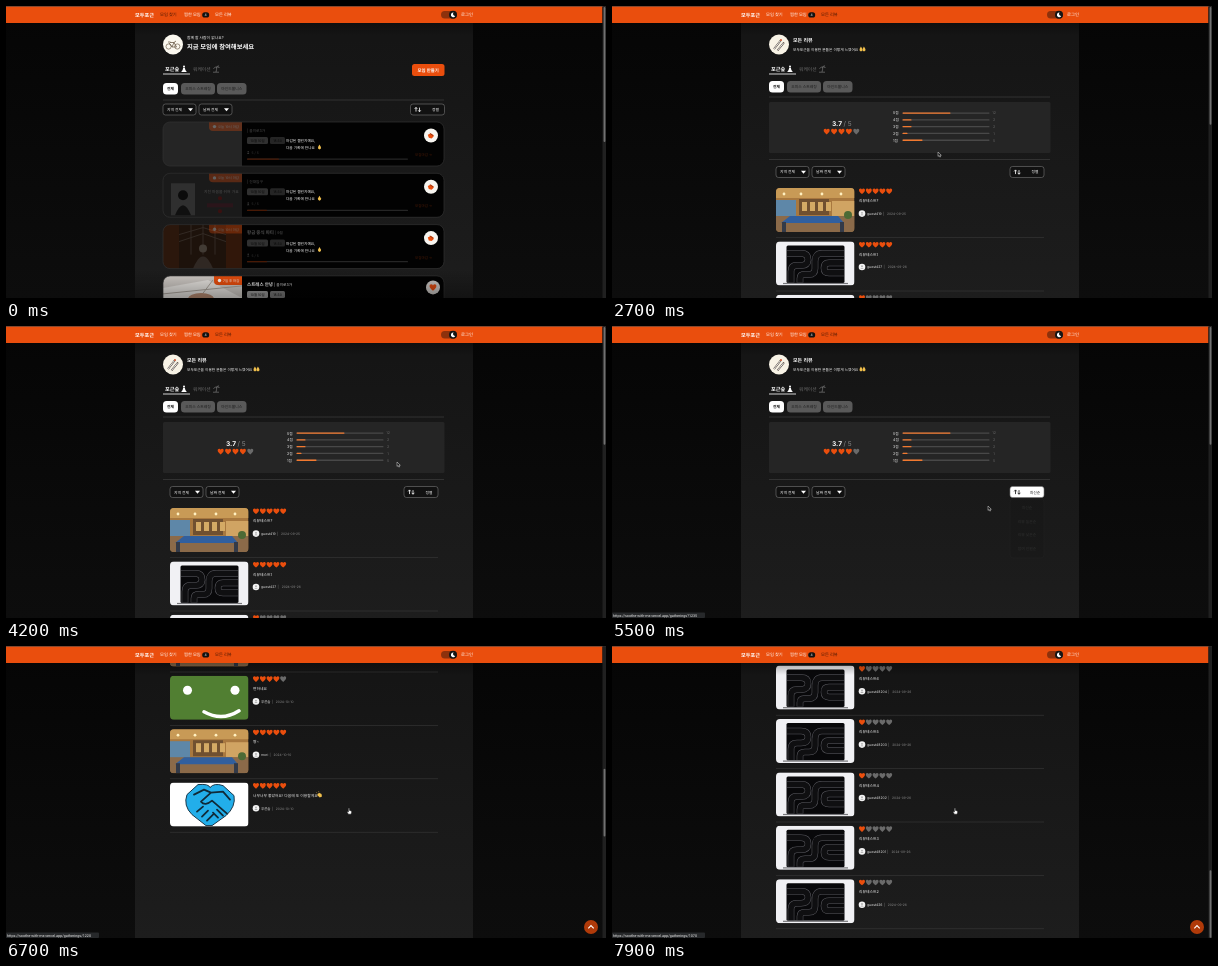
An HTML page that plays this animation: 600x292 px, repeating every 8 s.

```html
<!DOCTYPE html>
<html lang="ko">
<head>
<meta charset="utf-8">
<style>
html, body { margin: 0; width: 100%; height: 100%; overflow: hidden; background: #080808; }
svg { display: block; width: 100vw; height: 100vh; font-family: Inter, "Noto Sans CJK KR", "Noto Sans CJK", sans-serif; text-rendering: geometricPrecision; }
</style>
</head>
<body>
<svg id="stage" viewBox="0 0 600 292"></svg>
<script>
const LOOP = 8000;
const ORANGE = '#ea4e0d';
const PITCH = 53.4;
const HEART = 'M0 2.9C-4 .2-3.4-2.7-1.5-2.7Q-.4-2.7 0-1.7Q.4-2.7 1.5-2.7C3.4-2.7 4 .2 0 2.9Z';

const text = (x, y, size, fill, s, extra = '') =>
  `<text x="${x}" y="${y}" font-size="${size}" fill="${fill}" ${extra}>${s}</text>`;
const rect = (x, y, w, h, fill, r = 0, extra = '') =>
  `<rect x="${x}" y="${y}" width="${w}" height="${h}" rx="${r}" fill="${fill}" ${extra}/>`;
const circle = (x, y, r, fill, extra = '') =>
  `<circle cx="${x}" cy="${y}" r="${r}" fill="${fill}" ${extra}/>`;
const path = (d, fill, extra = '') => `<path d="${d}" fill="${fill}" ${extra}/>`;
const line = (x1, x2, y, color = '#444') => rect(x1, y, x2 - x1, .6, color);
const group = (id, body, extra = '') => `<g id="${id}" ${extra}>${body}</g>`;
const at = (x, y, body) => `<g transform="translate(${x} ${y})">${body}</g>`;
const BOLD = 'font-weight="700"';
const MID = 'text-anchor="middle"';

const hearts = (score, step) => [0, 1, 2, 3, 4]
  .map(i => at(i * step, 0, path(HEART, i < score ? ORANGE : '#6a6a6a'))).join('');

// Short strands scattered over the noodle bowl
const strands = Array.from({ length: 26 }, (_, i) => {
  const angle = i * 2.4, r = 2.6 * Math.sqrt(i);
  const color = ['#d8b078', '#5f7a3a', '#3b2a1e', '#b5402c'][i % 4];
  return path(`M${(39 + r * Math.cos(angle)).toFixed(1)} ${(24 + r * .65 * Math.sin(angle)).toFixed(1)}q2-2.5 4-.5`,
    'none', `stroke="${color}" stroke-width="1.3"`);
}).join('');

// Thumbnails, 78.5 x 44
const pictures = {
  laptop: rect(0, 0, 78.5, 44, '#f1f1f4') + rect(10.5, 4, 58, 37.5, '#08080a', 1.5) +
    [['#5a5a60', 6.6], ['#0f0f11', 5.6]].map(([color, width]) => path(
      'M11 12H25Q32 12 32 18T25 24H21Q15 24 15 30V41M24 41V37Q24 33 29 33H33Q39 33 39 27V20Q39 12 46 12H68' +
      'M68 21.5H53Q48 21.5 48 26.5T53 31.5H68', 'none', `stroke="${color}" stroke-width="${width}"`)).join('') +
    rect(7, 41.5, 65, 1.2, '#77777b'),
  office: rect(0, 0, 78.5, 44, '#a8783f') + rect(0, 0, 78.5, 10, '#c89a56') +
    rect(0, 12, 20, 17, '#5e87a8') + rect(23, 11, 30, 16, '#705030') + rect(56, 13, 22.5, 15, '#d0a463') +
    [26, 34, 42, 50].map(x => rect(x, 14, 5, 9, '#d4aa65')).join('') +
    rect(0, 28, 78.5, 16, '#8b6a49') + path('M14 28H62L68 35H5Z', '#315f9e') +
    rect(6, 34, 4, 10, '#333a48') + rect(64, 34, 4, 10, '#333a48') +
    [8, 25, 46, 65].map(x => circle(x, 6, 1.4, '#fff0c0')).join('') + circle(72, 27, 4, '#4c6a35'),
  noodles: rect(0, 0, 78.5, 44, '#aaa8a4') + '<ellipse cx="39" cy="24" rx="33" ry="19.5" fill="#ececea"/>' +
    '<ellipse cx="39" cy="25" rx="20" ry="13" fill="#d3cec6"/><ellipse cx="40" cy="24.5" rx="15" ry="9.5" fill="#86603b"/>' +
    strands + path('M35 17L45 8L43 18Z', '#d9a070'),
  smile: rect(0, 0, 78.5, 44, '#517f32') + circle(17.5, 14.5, 4.5, '#fff') + circle(65, 14.5, 4.5, '#fff') +
    path('M34 36Q52 46 69 35', 'none', 'stroke="#fff" stroke-width="3.4" stroke-linecap="round"'),
  hands: rect(0, 0, 78.5, 44, '#fff') +
    path('M17 12L28 2Q39 1 40 5Q44 0 53 3L64 13Q66 24 56 33L42 43H36L22 32Q13 23 17 12Z', '#22aeea', 'stroke="#17374a" stroke-width="1"') +
    path('M24 12L34 7L41 10L53 9L60 17M41 10L31 19Q35 24 42 18L57 31M27 29L33 24M32 34L38 28M37 38L43 32M48 35L43 30M53 33L47 27',
      'none', 'stroke="#102a38" stroke-width="1.8" stroke-linecap="round" stroke-linejoin="round"'),
};

const trial = (n, score, user) => ({ pic: 'laptop', score, title: '리뷰테스트' + n, user, date: '2024-09-26' });
const oldest = [
  { pic: 'office', score: 5, title: '리뷰테스트?', user: 'guest419', date: '2024-09-25' },
  trial(1, 5, 'guest427'), trial(2, 1, 'guest426'), trial(3, 1, 'guest48201'), trial(4, 1, 'guest48202'),
  trial(5, 1, 'guest48203'), trial(6, 1, 'guest48204'), trial(7, 2, 'guest48205'), trial(8, 3, 'guest48206'),
  { pic: 'noodles', score: 5, title: 'ddasdsa', user: '푸른솔', date: '2024-10-04' },
];
const recent = (pic, score, title, user = '푸른솔') => ({ pic, score, title, user, date: '2024-10-10' });
const newest = [
  recent('office', 5, '좋아요'), recent('smile', 5, '편안했어요'), recent('office', 4, '추천합니다', 'mori'),
  recent('noodles', 5, '맛있어요'), recent('office', 5, '또 올게요'), recent('smile', 5, '최고예요'),
  recent('office', 5, '재밌어요', 'mori'), recent('smile', 4, '편하네요'), recent('office', 5, '짱~', 'mori'),
  { ...recent('hands', 5, '너무너무 좋았어요! 다음에 또 이용할게요'), clap: true },
  recent('office', 5, '좋았어요'), recent('smile', 3, '괜찮아요'), ...oldest.slice().reverse(),
];

const clap = path('M147 12.5L149 10.2L151.5 11.5L152 13.8L149.8 15Z', '#f0bf4c') +
  path('M147.3 10.6L146.3 9.8M148.8 9.6L148.6 8.6', 'none', 'stroke="#f0bf4c" stroke-width=".5"');

const review = (r, i) => at(164, 182 + i * PITCH,
  `<g clip-path="url(#thumb)"><use href="#${r.pic}"/></g>` + at(86, 3.2, hearts(r.score, 6.8)) +
  text(83, 14.2, 3.8, '#f2f2f2', r.title) + (r.clap ? clap : '') +
  circle(86, 25.6, 3.3, '#f2f2f2') + circle(86, 24.8, .9, '#aaa') + path('M84.4 27.3Q86 25.2 87.6 27.3Z', '#aaa') +
  text(91, 27, 3.45, '#e0e0e0', `${r.user}<tspan dx="1.2" fill="#888">|</tspan><tspan dx="3" font-size="3.25" fill="#8b8b8b">${r.date}</tspan>`) +
  line(0, 268, 49.3, '#383838'));
const reviews = (list, from = 0) => list.map((r, i) => review(r, i + from)).join('');

const select = (x, y, label) =>
  rect(x, y, 33, 11, '#111', 2.5, 'stroke="#777" stroke-width=".6"') + text(x + 4, y + 7, 3.8, '#fff', label) +
  path(`M${x + 25} ${y + 4.3}h5l-2.5 3z`, '#fff');
const sortArrows = (x, y, c) =>
  path(`M${x} ${y + 2}v-4m-1.3 1.3l1.3-1.5l1.3 1.5M${x + 3.5} ${y - 2}v4m-1.3-1.3l1.3 1.5l1.3-1.5`, 'none', `stroke="${c}" stroke-width=".8"`);
const sortButton = (x, y, label, on) =>
  rect(x, y, 34, 11, on ? '#fff' : '#111', 2.5, 'stroke="#777" stroke-width=".6"') +
  sortArrows(x + 5.5, y + 5.6, on ? '#111' : '#fff') + text(x + 25, y + 7, 3.8, on ? '#111' : '#fff', label, MID);

const chip = (x, y, w, label, on) => rect(x, y, w, 11.5, on ? '#fff' : '#595959', 3.5) +
  text(x + w / 2, y + 7.2, 3.8, on ? '#111' : '#1b1b1b', label, `${MID} ${on ? BOLD : ''}`);

const tabs = chipY =>
  text(159, 64.8, 5.2, '#fff', '포근숲', BOLD) +
  circle(178, 60.6, 1, '#fff') + path('M177.2 61.8H178.8L179.4 64L180.8 66H175.2L176.6 64Z', '#fff') +
  rect(157, 67.6, 27, .8, '#fff') + text(187, 64.8, 4.8, '#6c6c6c', '워케이션') +
  path('M207 66.2H213M210 66Q211 63 210.5 60.8M207.5 62.8Q209 60 213.5 61.5M211 60.5L213 59.8', 'none', 'stroke="#777" stroke-width=".7"') +
  chip(157, chipY, 15, '전체', true) + chip(175, chipY, 34, '오피스 스트레칭') + chip(211, chipY, 29.5, '마인드풀니스');

const pray = (x, y) => path(`M${x} ${y}q-2.2-1-1.4-2.6L${x - .1} ${y - 5}L${x + 1.4} ${y - 2.6}q.8 1.6-1.4 2.6`, '#f0bf4c');

function card(i, title, place, picture, open) {
  const dim = open ? 1 : .3;
  const tagX = open ? 51 : 46;
  const body = rect(0, 0, 281, 44, '#020202', 7) +
    `<g clip-path="url(#card)"><g opacity="${open ? 1 : .3}">${picture}</g>` +
    `<g opacity="${dim}">${path(`M${tagX} 0H79V9H${tagX + 4}Q${tagX} 9 ${tagX} 5Z`, ORANGE)}${circle(tagX + 5.5, 4.6, 1.7, '#fff')}` +
    `${text(tagX + 9, 6.1, 3.4, '#fff', open ? '7일 후 마감' : '오늘 19시 마감')}</g></g>` +
    `<g opacity="${dim}">` + text(84, 9.8, 4.5, '#fff', `${title} <tspan font-weight="400" font-size="3.7">| ${place}</tspan>`, BOLD) +
    rect(84, 15, 21, 7, '#999', 1.5) + text(94.5, 20, 3.4, '#111', '10월 10일', MID) +
    rect(107, 15, 15, 7, '#777', 1.5) + text(114.5, 20, 3.4, '#111', '18:30', MID) +
    circle(85.2, 29.7, .8, '#aaa') + path('M84 32Q85.2 29.6 86.4 32Z', '#aaa') + text(88.5, 32, 3.4, '#aaa', '5 / 5') +
    rect(84, 36.5, 161, 1.2, '#777', .6) +
    rect(84, 36.5, i ? 20 : 32, 1.2, ORANGE, .6) + text(252, 34, 3.5, ORANGE, '모집마감 →') + '</g>' +
    (open ? '' : text(123, 20.2, 3.7, '#fff', '마감된 챌린지예요,') + text(123, 27.2, 3.65, '#fff', '다음 기회에 만나요') + pray(156.5, 27.5)) +
    circle(open ? 270 : 268, open ? 11.5 : 13.5, 7, open ? '#c9c5c2' : '#f7f5f0') +
    (open ? at(270, 11.5, path(HEART, '#d9480f', 'transform="scale(1.15)"'))
          : at(267.8, 13.8, path('M-3-1L0-2.6L3-.6L2.6 1L.8 2.6L-2 2Z', ORANGE) + path('M-1-2.6L2.4 0', 'none', 'stroke="#743018" stroke-width=".7"'))) +
    rect(0, 0, 281, 44, 'none', 7, 'stroke="#333" stroke-width=".7"');
  return at(157, 116 + i * 51.3, body);
}

const cardPictures = [
  rect(0, 0, 79, 44, '#777'),
  rect(0, 0, 79, 44, '#555') + rect(8, 10, 24, 32, '#999') + circle(20, 22, 5, '#222') + path('M12 42Q20 22 28 42Z', '#333') +
    text(41, 20, 3.8, '#fff', '지친 마음을 쉬어 가요') + circle(57, 25, 2, '#b33') + rect(44, 30, 26, 4, '#845') + circle(57, 38, 2, '#b33'),
  rect(0, 0, 79, 44, '#5d3823') + rect(0, 0, 16, 44, '#8d4a26') + rect(63, 0, 16, 44, '#a04a20') +
    path('M16 10L40 3L63 10M16 17L40 9L63 17M28 0V30M40 0V30M52 0V30', 'none', 'stroke="#a28672" stroke-width="1"') +
    circle(40, 24, 4, '#d8c0aa') + path('M30 44Q40 20 50 44Z', '#9b8272'),
  rect(0, 0, 79, 44, '#cfcac5') + path('M0 12L45 4L79 22V44H0Z', '#e8e5e1') + path('M0 18L79 10M20 44L50 4', 'none', 'stroke="#aaa39b"') +
    '<ellipse cx="38" cy="23" rx="13" ry="6" fill="#b98c72"/>',
];

const gatherings =
  circle(167, 38.5, 10, '#fbf8ef') +
  path('M163.2 37L166 41H170.5L168 36.5H164M166 41L168 36.5M162 36H164.5M168 36.5L170 35', 'none', 'stroke="#5b4a35" stroke-width=".7"') +
  circle(162.6, 40.5, 2.6, 'none', 'stroke="#5b4a35" stroke-width=".6"') + circle(171.3, 40.5, 2.6, 'none', 'stroke="#5b4a35" stroke-width=".6"') +
  text(181, 32.5, 3.8, '#fff', '함께 할 사람이 없나요?') + text(181, 43.3, 6.35, '#fff', '지금 모임에 참여해보세요', BOLD) +
  tabs(77) + rect(406, 58, 32.5, 12, ORANGE, 2.5) + text(422.2, 65.8, 4.4, '#fff', '모임 만들기', `${MID} ${BOLD}`) +
  line(157, 438, 93.7) + select(157, 98, '지역 전체') + select(193, 98, '날짜 전체') + sortButton(404.5, 98, '정렬') +
  card(0, '', '을지로3가', cardPictures[0]) + card(1, '', '건대입구', cardPictures[1]) +
  card(2, '황금 중식 파티', '9월', cardPictures[2]) + card(3, '스트레스 안녕', '을지로3가', cardPictures[3], true) +
  rect(129, 264, 338, 28, 'url(#bottomFade)');

const histogram = [[12, 48], [2, 9], [2, 9], [1, 5], [5, 20]].map(([n, w], i) => {
  const y = 107 + i * 6.8;
  return text(281, y + 1.5, 3.7, '#eee', `${5 - i}점`) + rect(290.5, y - .6, 87, 1.3, '#484848', .6) +
    rect(290.5, y - .6, w, 1.3, '#f2792f', .6) + text(382, y + 1.4, 3.6, '#666', n, MID);
}).join('');

const reviewTop =
  circle(167, 38.5, 10, '#f8f3e6') +
  path('M162 43L169 34M165.5 44.5L172 36.5', 'none', 'stroke="#4b4038" stroke-width="1.8"') +
  path('M162 43L168.5 34.5M165.5 44.5L171.5 37', 'none', 'stroke="#fff" stroke-width=".9"') + circle(169, 34, 1, '#d85b39') +
  text(181, 36, 5, '#fff', '모든 리뷰', BOLD) + text(181, 45, 3.7, '#fff', '모두포근을 이용한 분들은 이렇게 느꼈어요') +
  pray(249, 45.5) + pray(252, 45.5) + tabs(75) + line(157, 438, 90.7) +
  rect(157, 96, 281.5, 51, '#252525', 1.5) +
  text(220, 120, 6.6, '#fff', '3.7 <tspan font-weight="400" fill="#888">/ 5</tspan>', BOLD) +
  at(214.7, 125.5, group('score', '')) + histogram + line(157, 438, 153.2) +
  select(164, 160.5, '지역 전체') + select(200, 160.5, '날짜 전체') + group('sort', '');

const options = ['최신순', '리뷰 높은순', '리뷰 낮은순', '참여 인원순'];
const dropdown = rect(398, 173, 34, 59, '#0a0d0b', 3, 'stroke="#555" stroke-width=".6"') +
  options.map((s, i) => text(415, 183 + i * 13.7, 3.8, '#fff', s, MID)).join('');

const header = rect(129, 17, 338, 12, 'url(#shade)') + rect(0, 0, 596.5, 17, ORANGE) + rect(0, 0, 600, .6, '#4b4542') +
  text(129, 10.7, 5.2, '#fff', '모두포근', BOLD) +
  text(154, 10.4, 4.25, '#fff', '모임 찾기', 'id="navFind" font-weight="500"') +
  text(178, 10.4, 4.25, '#fff', '찜한 모임', 'font-weight="500"') +
  rect(196.2, 6.3, 7, 5.2, '#111', 2.6) + text(199.7, 10.2, 3.4, '#fff', '4', MID) +
  text(209, 10.4, 4.25, '#fff', '모든 리뷰', 'id="navReviews" font-weight="500"') +
  rect(435, 5, 16, 7.5, '#8d310c', 3.7) + circle(447, 8.8, 4, '#151515') +
  path('M447.6 6.6A2.3 2.3 0 1 0 449.2 10A2 2 0 0 1 447.6 6.6', '#fff') + text(455, 10.4, 4.3, '#fff', '로그인', 'font-weight="500"');

const arrow = path('M0 0V5.2L1.3 4.1L2.2 6L3.1 5.6L2.3 3.8H3.9Z', '#111', 'stroke="#ddd" stroke-width=".6" transform="scale(.85)"');
const hand = path('M-.6-2.6Q0-3.2 .5-2.6V-.6L2.6 0V2L1.8 3.2H-.6L-2 1L-1.4 .4L-.6 1Z', '#fff', 'stroke="#111" stroke-width=".5"');

const fade = (id, stops) => `<linearGradient id="${id}" x2="0" y2="1">` +
  stops.map(([c, o], i) => `<stop offset="${i}" stop-color="${c}" stop-opacity="${o}"/>`).join('') + '</linearGradient>';
const stage = document.getElementById('stage');
stage.innerHTML = '<defs>' +
  fade('side', [['#050505', 1], ['#0d0d0d', 1]]) + fade('column', [['#141414', 1], ['#1d1d1d', 1]]) +
  fade('shade', [['#000', .3], ['#000', 0]]) + fade('bottomFade', [['#000', 0], ['#000', .35]]) +
  '<clipPath id="thumb"><rect width="78.5" height="44" rx="4"/></clipPath>' +
  '<clipPath id="card"><rect width="281" height="44" rx="7"/></clipPath>' +
  Object.entries(pictures).map(([id, body]) => group(id, body)).join('') + '</defs>' +
  rect(0, 0, 600, 292, 'url(#side)') + rect(129, 0, 338, 292, 'url(#column)') +
  group('gatherings', gatherings) +
  group('reviewPage', reviewTop + group('oldest', reviews(oldest)) +
    group('newest', reviews(newest.slice(0, 10))) + group('more', reviews(newest.slice(10, 20), 10)) + group('menu', dropdown)) +
  header + rect(596.5, .6, 3.5, 291.4, '#202020') + rect(597.6, 1, 1.8, 118, '#707070', .9, 'id="thumbBar"') +
  group('toTop', circle(585, 281, 7, '#b03a09') + path('M582.3 282.3L585 279.6L587.7 282.3', 'none', 'stroke="#fff" stroke-width="1.1"')) +
  group('status', rect(0, 286.5, 74, 5.5, '#27292b', 1, 'id="statusBox"') + text(1, 290.7, 3.7, '#f0f0f0', '', 'id="url" style="font-family:Roboto,sans-serif"')) +
  group('cursor', group('arrow', arrow) + group('hand', hand));

const el = {};
stage.querySelectorAll('[id]').forEach(n => el[n.id] = n);

const ease = p => p * p * (3 - 2 * p);
const ramp = (t, a, b) => Math.min(1, Math.max(0, (t - a) / (b - a)));
const show = (node, on) => node.setAttribute('display', on ? 'inline' : 'none');
const move = (node, x, y) => node.setAttribute('transform', `translate(${x} ${y})`);

// Keys are [time, ...values], eased between neighbours
function track(keys, t) {
  const i = keys.findIndex(k => k[0] > t);
  if (i === 0) return keys[0].slice(1);
  if (i < 0) return keys[keys.length - 1].slice(1);
  const [a, b] = [keys[i - 1], keys[i]];
  const p = ease(ramp(t, a[0], b[0]));
  return a.slice(1).map((v, j) => v + (b[j + 1] - v) * p);
}

const pointer = [[300, 330, 150], [1050, 217, 9], [1500, 217, 9], [2000, 286, 80], [2600, 326, 146], [3600, 326, 146],
  [4100, 391, 136], [4300, 391, 136], [4700, 416, 166], [4900, 416, 166], [5200, 415, 182], [5350, 415, 182],
  [5490, 376, 180], [5600, 376, 180], [6000, 343, 165]];
const scrolling = [[2700, 0], [3150, 429.4], [3600, 429.4], [4050, 0], [6050, 0], [6550, 429.4], [6700, 526], [6900, 526], [7500, 963.4]];
const links = [[0, ''], [1050, 'reviews'], [2300, ''], [5450, 'gatherings?1235'], [5900, ''], [6450, 'gatherings/1220'],
  [7300, 'gatherings/1132'], [7500, 'gatherings/1070']];

function appear(node, t, start, length) {
  const p = ramp(t, start, start + length);
  node.setAttribute('opacity', p);
  move(node, 0, 8 * (1 - p));
}

function setOnce(node, key, html) {
  if (node.dataset.n === key) return;
  node.dataset.n = key;
  node.innerHTML = html;
}

function update(t) {
  const onReviews = t >= 1500;
  const sorted = t >= 5400;
  const [scroll] = track(scrolling, t);
  show(el.gatherings, !onReviews);
  show(el.reviewPage, onReviews);
  move(el.reviewPage, 0, -scroll);
  el.navFind.setAttribute('fill', onReviews ? '#fff' : '#4b1805');
  el.navReviews.setAttribute('fill', onReviews ? '#4b1805' : '#fff');

  const score = t < 2100 ? 3 : 4;
  setOnce(el.score, String(score), hearts(score, 7.4));
  setOnce(el.sort, String(sorted), sortButton(398, 160.5, sorted ? '최신순' : '정렬', sorted));
  show(el.oldest, !sorted);
  appear(el.oldest, t, 1800, 570);
  appear(el.newest, t, 5600, 400);
  appear(el.more, t, 6720, 300);
  el.menu.setAttribute('opacity', ramp(t, 4720, 4850) * (1 - ramp(t, 5400, 5510)));

  const height = !onReviews ? 630 : t < 6500 ? 722 : 1256;
  el.thumbBar.setAttribute('y', 1 + scroll / height * 291);
  el.thumbBar.setAttribute('height', 291 * 292 / height);
  show(el.toTop, scroll > 100);

  const link = links.filter(k => k[0] <= t).pop()[1];
  show(el.status, link);
  el.url.textContent = 'https://soothe-with-me.vercel.app/' + link;
  el.statusBox.setAttribute('width', link === 'reviews' ? 73 : 93);

  const [x, y] = track(pointer, t);
  const pointing = (t > 1000 && t < 1600) || (t > 4650 && t < 5400) || t > 6000;
  show(el.cursor, t >= 300);
  move(el.cursor, x, y);
  show(el.hand, pointing);
  show(el.arrow, !pointing);
}

const start = performance.now();
function frame() {
  update((performance.now() - start) % LOOP);
  requestAnimationFrame(frame);
}
frame();
</script>
</body>
</html>
```
